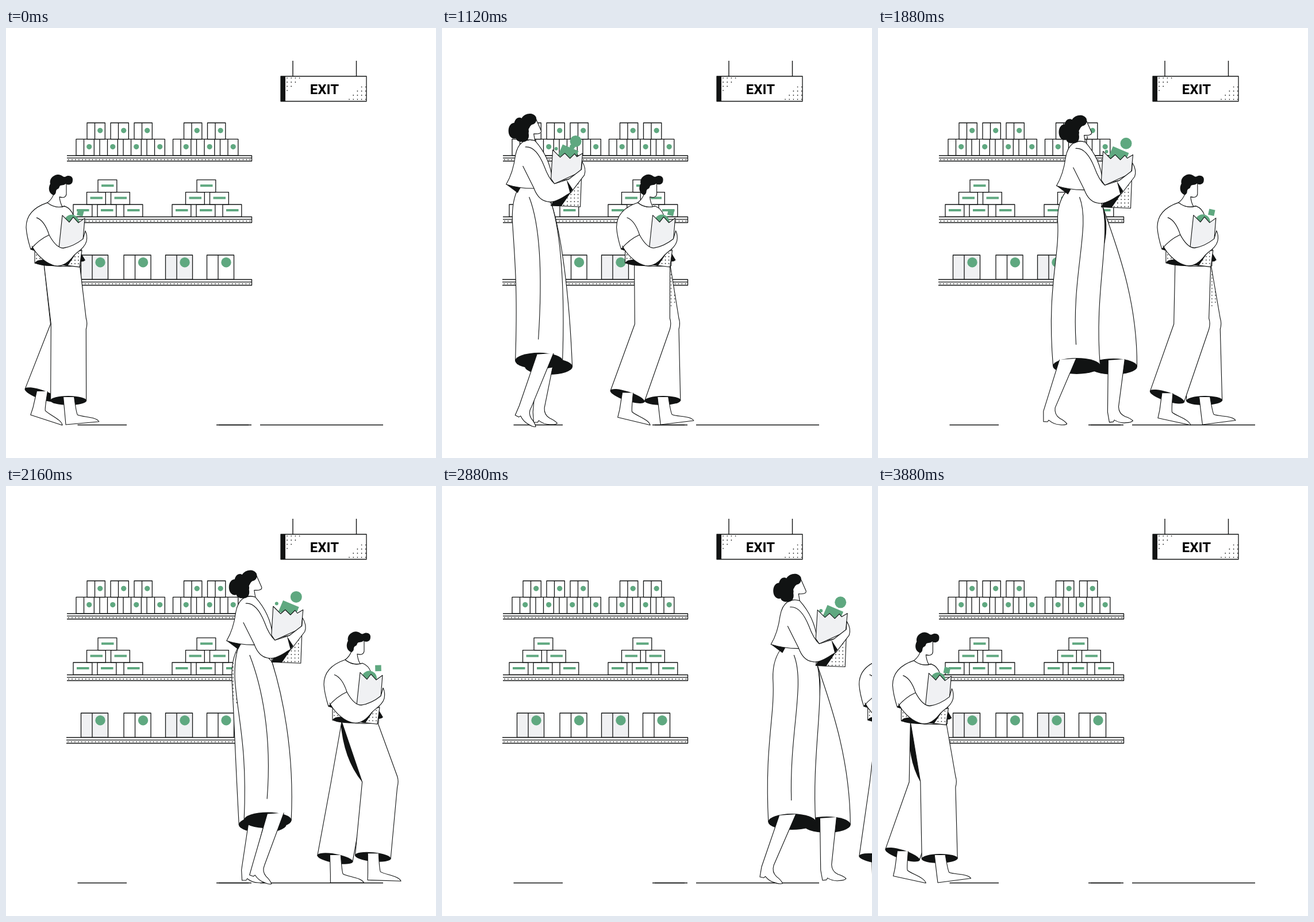
These frames come from a looping animation (748 by 748 pixels, 3.92 s). An HTML page with a canvas:

```html
<!DOCTYPE html>
<html>
<head>
<meta charset="utf-8">
<style>
html, body { margin: 0; width: 100%; height: 100%; overflow: hidden; background: #fff; }
canvas { display: block; }
</style>
</head>
<body>
<canvas id="stage" width="748" height="748"></canvas>
<script>
const ctx = document.getElementById('stage').getContext('2d');
const INK = '#111313', GREEN = '#5fa880', GREY = '#f0f1f3', WHITE = '#fff';
const LOOP = 3920, STEP = 40, TAU = Math.PI * 2, DEG = TAU / 360;

function fill(d, color) {
  ctx.fillStyle = color;
  ctx.fill(new Path2D(d));
}
function line(d, width = 1.1) {
  ctx.lineWidth = width;
  ctx.strokeStyle = INK;
  ctx.stroke(new Path2D(d));
}
function shape(d, color = WHITE, width) {
  fill(d, color);
  line(d, width);
}
function disc(x, y, r, color = GREEN) {
  ctx.fillStyle = color;
  ctx.beginPath();
  ctx.arc(x, y, r, 0, TAU);
  ctx.fill();
}
function box(x, y, w, h, color = WHITE) {
  shape(`M${x},${y}h${w}v${h}h${-w}z`, color, 1.3);
}
function bar(x, y, w, h, color) {
  ctx.fillStyle = color;
  ctx.fillRect(x, y, w, h);
}
function dots(x, y, cols, rows, gap, keep = () => true) {
  for (let r = 0; r < rows; r++)
    for (let c = 0; c < cols; c++)
      if (keep(c, r)) disc(x + c * gap, y + r * gap, 0.85, INK);
}
function within(d, paint) {
  ctx.save();
  ctx.clip(new Path2D(d));
  paint();
  ctx.restore();
}
function moved(x, y, paint, angle = 0) {
  ctx.save();
  ctx.translate(x, y);
  ctx.rotate(angle);
  paint();
  ctx.restore();
}
function block(x, y, w, h, angle) {
  moved(x, y, () => bar(-w / 2, -h / 2, w, h, GREEN), angle);
}
function hem(x, y, rx, ry, angle = 0) {
  ctx.fillStyle = INK;
  ctx.beginPath();
  ctx.ellipse(x, y, rx, ry, angle, 0, TAU);
  ctx.fill();
}

function shelf(x, y, h) {
  fill(`M${x},${y}H427.5V${y + h}H${x}z`, WHITE);
  line(`M${x},${y}H427.5V${y + h}H${x}M${x},${y + h * 0.43}H427.5`, 1.3);
  dots(x + 3, y + h * 0.73, 54, 1, 5.95);
}
function cartons(x, y, count) {
  for (let i = 0; i < count; i++, x += 41) {
    box(x, y, 31.3, 28.5);
    line(`M${x + 13.5},${y}v28.5`, 1.3);
    disc(x + 22.7, y + 13.3, 4.6);
  }
}
function pyramid(x) {
  [[0, 42, 88], [23.5, 65.5], [43]].forEach((row, level) => row.forEach(dx => {
    const y = 307 - 21.4 * level;
    box(x + dx, y, 32.8, 21.4);
    bar(x + dx + 6, y + 8, 21.5, 4, GREEN);
  }));
}

function scene() {
  line('M499,57V84M609.5,57V84', 1.4);
  box(478, 84, 149, 43.5);
  bar(478, 84, 8, 43.5, INK);
  dots(489, 87, 4, 4, 7.2, (c, r) => c + r < 4);
  dots(597, 102.5, 5, 4, 7.2, (c, r) => c + r > 2);
  ctx.fillStyle = '#000';
  ctx.font = 'bold 24px Roboto, Arial, sans-serif';
  ctx.textAlign = 'center';
  ctx.fillText('EXIT', 554, 114.5);

  for (const [x, count] of [[122, 4], [290.5, 3]]) {
    cartons(x, 193.3, count);
    cartons(x + 19, 165, count - 1);
  }
  shelf(106, 222, 9.5);

  pyramid(117);
  pyramid(289);
  shelf(106, 328.5, 10);

  [130.5, 205, 277.5, 349.5].forEach((x, i) => {
    box(x, 395, 47, 42.5, i % 2 ? WHITE : GREY);
    line(`M${x + 19.5},395v42.5`, 1.3);
    disc(x + 33.5, 407.7, 8.7);
  });
  shelf(105, 437.5, 10);
  line('M124.5,690.5H210M366,690.5H427M442,690.5H656', 1.3);
  line('M370,690.5H422', 1.7);
}

// One leg of a walk: the foot is planted from strike to lift, then swings forward.
// along(front, rear, out, in) slides back evenly and returns on a cubic with those end slopes.
function stride(t, { period, strike, lift }) {
  const since = ((t - strike) % period + period) % period, planted = lift - strike;
  const p = Math.min(1, since / planted);
  const u = Math.max(0, (since - planted) / (period - planted));
  const raise = Math.sin(Math.PI * u) * (1 - u);
  const toeUp = u ? 8 * u ** 4 : 8 * Math.max(0, 1 - 2.3 * p);
  const along = (front, rear, slopeOut, slopeIn) => {
    if (!u) return front + (rear - front) * p;
    const ease = u * u * (3 - 2 * u);
    return rear + (front - rear) * ease + slopeOut * u * (1 - u) ** 2 - slopeIn * u * u * (1 - u);
  };
  return { raise, toeUp, along };
}

// Maps foot coordinates (heel at the origin) to the stage.
function footSpace(x0, y0, degrees) {
  const c = Math.cos(degrees * DEG), s = Math.sin(degrees * DEG);
  return (x, y) => `${x0 + x * c - y * s},${y0 + x * s + y * c}`;
}

const manGait = { period: 768, strike: -52, lift: 290, speed: 0.2398 };

function manPose(t) {
  const { raise, toeUp, along } = stride(t, manGait);
  const pitch = 36 * raise - toeUp;
  const heelX = along(116.5, 34.4, -25, -40), kneeX = along(116, 72, 200, -110);
  const hemX = heelX + 8 + 0.65 * pitch;
  return {
    kneeX, hemX,
    hemY: 648 - 20 * raise,
    tilt: Math.atan((kneeX - hemX) / 132),
    at: footSpace(heelX, 690 - 34 * raise, pitch)
  };
}

function manLeg({ kneeX, hemX, hemY, tilt, at }, decorate) {
  const dx = 31 * Math.cos(tilt), dy = 31 * Math.sin(tilt);
  const pants = `M66,410L${kneeX - 31},515L${hemX - dx},${hemY - dy}L${hemX + dx},${hemY + dy}` +
    `L${kneeX + 30},524Q${kneeX + 33},514 ${kneeX + 30},505L128,410`;
  shape(pants);
  if (decorate) within(pants, decorate);
  hem(hemX, hemY, 31.5, 8, tilt);
  shape(`M${hemX - 9},${hemY - 6}L${at(0, -14)}L${at(0, 0)}L${at(58, 0)}` +
    `C${at(54, -9)} ${at(31, -10)} ${at(22, -15)}Q${at(20, -18)} ${hemX + 10},${hemY - 6}`);
}

function man(t) {
  const near = manPose(t), far = manPose(t + manGait.period / 2);
  const lead = near.kneeX - far.kneeX;
  const swing = Math.cos((t - 10) / 384 * TAU);
  manLeg(far, () => {
    if (lead > 5) {
      const x = near.kneeX - 31, bulge = Math.min(9, lead / 2);
      fill(`M64,410L67,410L${x},515Q${(65 + x) / 2 - bulge * 1.6},475 64,410z`, INK);
    }
    dots(112, 417, 5, 14, 6, (c, r) => r < 14 - Math.abs(c - 1));
  });
  manLeg(near);

  moved(0, swing * 0.9, () => {
    fill('M129,388L138,403Q134,407 127,405z', INK);
    shape('M72,303C48,311 35,325 35,346Q36,362 43,384L50,386V408Q85,416 130,413' +
      'L132,360L117,325Q113,313 102,309Q86,314 72,303z');
    dots(53, 388, 4, 3, 6);
    fill('M50,408Q52,402 66,402Q75,408 85,413Q62,414 50,408zM43,384L53,376L50,387z', INK);

    disc(114, 336 + swing, 13);
    block(129.5, 319 + swing * 1.6, 10.5, 10.5, (6 + 9 * swing) * DEG);
    const base = 'M98,392L132,386L128,415L96,411z';
    shape(base);
    within(base, () => dots(102, 391, 5, 5, 6));
    fill('M96,411L124,388L107,413z', INK);
    shape('M98,325L110,337L117,328L126,338L137,330L134,368Q125,382 92,382z', GREY);

    shape('M75,359C82,372 90,382 100,382C112,380 124,374 134,366L138,352Q142,360 140,370' +
      'C137,382 124,388 118,395C105,412 92,416 80,411C66,406 52,392 45,378');
    line('M43,384Q57,367 75,359Q67,334 53,329');

    fill('M83,288Q80,297 72,303Q86,314 102,309L98,309L94,293Q104,297 105,289V268L88,262z', WHITE);
    line('M105,270V288Q104,296 93,293Q94,303 98,310M83,288Q80,297 72,303Q86,314 102,309');
    fill('M83,290C74,287 73,277 77,270C75,260 84,254 91,254C97,254 99,259 103,258' +
      'C109,254 117,257 116,264C116,272 108,273 104,270C99,274 95,271 93,275C92,280 88,278 87,283Q87,288 83,290z', INK);
  });
}

const womanGait = { period: 960, strike: -180, lift: 270, speed: 0.2617 };

function womanPose(t) {
  const { raise, toeUp, along } = stride(t, womanGait);
  const edge = along(45, -20, 0, 20), shinX = along(90, 4, 110, -30);
  return {
    edge, shinX,
    bend: shinX - edge - 37,
    hemY: 589 - 18 * raise,
    at: footSpace(along(81, -37, 15, 70), 686 - 22 * raise, 47 * raise - toeUp)
  };
}

function womanLeg({ edge, shinX, bend, hemY, at }, decorate) {
  const right = edge + 82, back = -6 + 0.22 * edge + 0.15 * bend;
  const skirt = `M7,279Q${back - 1},300 ${back},335C${back + 4},400 ${edge - 5 + 0.6 * bend},450 ${edge},${hemY}` +
    `L${right},${hemY}C${right - 5 + 0.6 * bend},460 82,360 65,306L40,279`;
  shape(skirt);
  if (decorate) within(skirt, decorate);
  hem(edge + 41, hemY, 41.5, 14);
  shape(`M${shinX - 15},${hemY - 11}L${at(-1, -18)}L${at(0, 0)}L${at(7, 0)}L${at(9, -3)}Q${at(18, 4)} ${at(28, 4)}` +
    `Q${at(38, 5)} ${at(41, 2)}Q${at(37, -3)} ${at(28, -7)}Q${at(18, -13)} ${at(19, -25)}L${shinX + 14},${hemY - 13}`);
}

function woman(t) {
  const near = womanPose(t), far = womanPose(t + womanGait.period / 2);
  const bob = 0.4 - 3.4 * Math.cos((t - 110) / 480 * TAU);
  womanLeg(far, () => dots(-9, 290, 5, 17, 6.2, (c, r) => r < 13 + c));
  const sliver = 10 * Math.sin((t + 60) / 960 * TAU);
  if (sliver > 1) fill(`M64,306Q${78 + sliver},350 ${near.edge + 73},425Q75,360 64,306z`, INK);
  womanLeg(near);
  line(`M26,294C46,345 ${near.edge + 38 + 0.6 * near.bend},430 ${near.edge + 40},${near.hemY - 37}`);

  moved(0, bob, () => {
    fill('M-14,272L6,287L12,276z', INK);
    shape('M15,198Q5,205 2,222Q-2,252 -14,272Q10,280 40,279L65,300L66,262Q62,225 36,196Q25,192 15,198z');

    disc(107, 197 + bob * 0.5, 10);
    disc(73, 210 + bob, 3);
    block(94, 218 + bob * 0.3, 30, 21, 0.4);
    const base = 'M70,268L117,258L115,311L64,309z';
    shape(base);
    within(base, () => dots(80, 271, 6, 7, 6.2));
    fill('M64,309L68,300L100,284L82,310z', INK);
    shape('M67,212L80,225L88,218L97,227L105,219L109,224L119,218L116,250L70,271L64,262z', GREY);

    shape('M15,240L34,278Q42,300 58,302Q70,305 92,290L99,286L122,256Q126,245 118,232' +
      'L117,246L95,263L70,271Q60,262 52,240Q38,205 19,207');
    fill('M91,264L102,281L97,287z', INK);

    fill('M34,183L36,197Q25,192 15,198L22,185L24,160L36,154L47,179Q48,185 40,186z', WHITE);
    line('M36,154L47,179Q48,185 34,184L36,196Q25,192 15,198');
    fill('M-10,179C-10,170 -5,165 0,165C2,156 9,154 13,157C18,148 33,146 38,155C40,162 37,167 31,168' +
      'C25,172 26,177 25,183C27,193 22,199 14,198C8,198 4,196 3,192C-4,194 -10,188 -10,179z', INK);
    disc(28.5, 177, 3.5, WHITE);
  });
}

function draw() {
  const t = Math.floor(performance.now() % LOOP / STEP) * STEP;
  ctx.fillStyle = WHITE;
  ctx.fillRect(0, 0, 748, 748);
  ctx.lineJoin = 'round';
  scene();
  // The man re-enters from the left before the loop restarts.
  const manTime = t > 3100 ? t - LOOP : t, womanTime = t - 640;
  moved(manTime * manGait.speed, 0, () => man(manTime));
  moved(womanTime * womanGait.speed, 0, () => woman(womanTime));
  requestAnimationFrame(draw);
}
draw();
</script>
</body>
</html>
```
